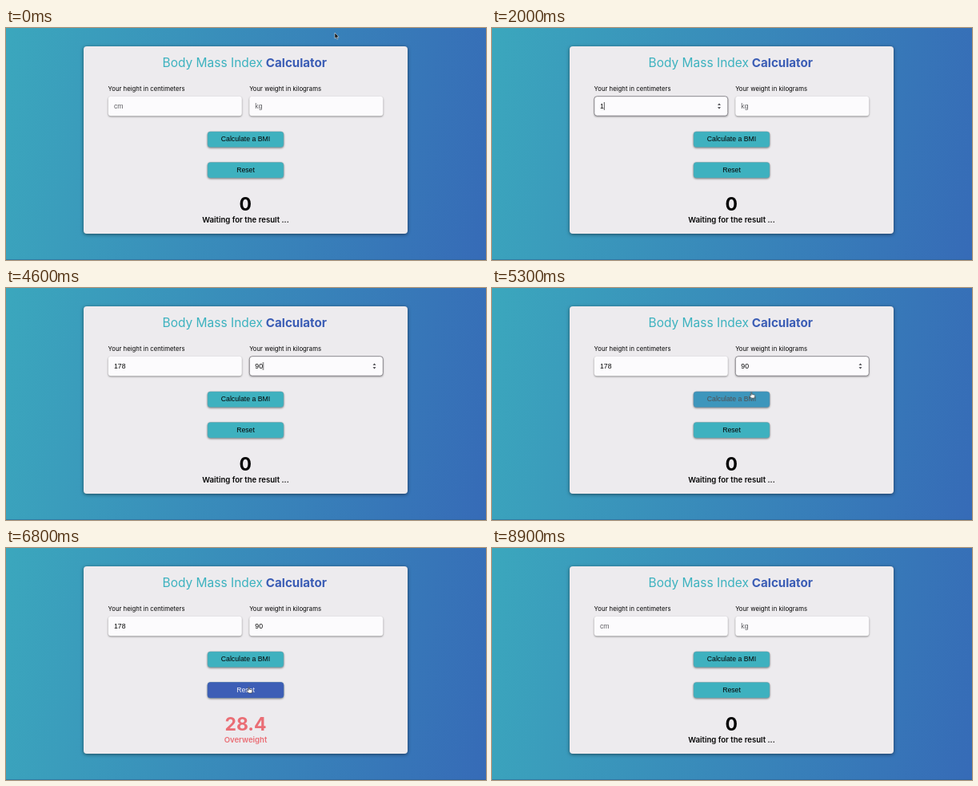
Animation, 600 px wide and 291 px high, one loop 9000 ms. Source, as an HTML page:

```html
<!DOCTYPE html>
<html lang="en">
<head>
<meta charset="utf-8">
<title>Body Mass Index Calculator</title>
<style>
html, body { margin: 0; width: 100%; height: 100%; overflow: hidden; }
body { background: linear-gradient(100deg, #3ba7bd, #366bb7); }
svg { display: block; width: 100vw; height: 100vh; }

text { font-family: Inter, "Open Sans", sans-serif; fill: #050505; }
.mid { text-anchor: middle; }
.title { font-size: 15.5px; fill: #3cb2bf; }
.strong { font-size: 15.15px; font-weight: 700; fill: #3b5db5; }
.label { font-size: 7.75px; }
.field, .btn text { font-family: "Liberation Sans", Arial, sans-serif; font-size: 8.7px; }
.hint { fill: #5c5c60; }
.score { font-size: 23px; font-weight: 700; }
.status { font-size: 9.6px; font-weight: 600; }
.over text { fill: #ea6e75; }

.card { fill: #edebee; filter: drop-shadow(0 1.5px 2px rgba(0, 0, 0, .5)); }
.box { fill: #fcfbfd; filter: drop-shadow(0 1.5px 1.2px rgba(0, 0, 0, .42)); }
.btn rect { fill: #3eb1bf; stroke: #6b9fa9; stroke-width: .5; }
.btn > rect { filter: drop-shadow(0 1.5px 1.2px rgba(0, 0, 0, .45)); }
.hover rect { fill: #3d5eb6; stroke: #4a64ae; }
.btn .hover text { fill: #f3f3f8; }
.ring { fill: none; stroke: #77747a; stroke-width: .8; }
.spin { fill: #3c3c40; }
.caret { fill: #111; }

/* Every timeline shares one 9 s loop; 1% is 90 ms */
.t { animation: 9s step-end infinite; }
.smooth { animation-timing-function: linear; }

.path { animation-name: path; }
.arrow { animation-name: arrow; }
.ibeam { animation-name: ibeam; }
.hand { animation-name: hand; }
.focus-h { animation-name: focus-h; }
.focus-w { animation-name: focus-w; }
.caret-h { animation-name: caret-h; }
.caret-w { animation-name: caret-w; }
.hint-h { animation-name: hint-h; }
.hint-w { animation-name: hint-w; }
.h1 { animation-name: h1; }
.h2 { animation-name: h2; }
.h3 { animation-name: h3; }
.w1 { animation-name: w1; }
.w2 { animation-name: w2; }
.idle { animation-name: idle; }
.over { animation-name: over; }
.hover-c { animation-name: hover-c; }
.hover-r { animation-name: hover-r; }

@keyframes path {
  0%, 1.1% { transform: translate(411px, 6px); }
  6.5%, 9% { transform: translate(380px, 50px); }
  16%, 31% { transform: translate(215px, 99px); }
  35.5% { transform: translate(296px, 110px); }
  39%, 53.3% { transform: translate(350px, 100px); }
  61%, 70% { transform: translate(316px, 147px); }
  74.5%, 85.5% { transform: translate(304.5px, 178px); }
  92%, 100% { transform: translate(300px, 302px); }
}
@keyframes arrow {
  0%, 55%, 70.4%, 86% { visibility: visible; }
  14.2%, 58.2%, 73%, 92% { visibility: hidden; }
}
@keyframes ibeam {
  0%, 21.5%, 45%, 55% { visibility: hidden; }
  14.2%, 31%, 53.3% { visibility: visible; }
}
@keyframes hand {
  0%, 70.4%, 86% { visibility: hidden; }
  58.2%, 73% { visibility: visible; }
}
@keyframes focus-h {
  0%, 39.5% { visibility: hidden; }
  17% { visibility: visible; }
}
@keyframes focus-w {
  0%, 62% { visibility: hidden; }
  39.5% { visibility: visible; }
}
@keyframes caret-h {
  0% { visibility: hidden; transform: none; }
  17% { visibility: visible; transform: none; }
  21.5% { visibility: visible; transform: translateX(4.8px); }
  25% { visibility: visible; transform: translateX(9.7px); }
  28% { visibility: visible; transform: translateX(14.5px); }
  33.5%, 100% { visibility: hidden; transform: translateX(14.5px); }
}
@keyframes caret-w {
  0% { visibility: hidden; transform: none; }
  39.5% { visibility: visible; transform: none; }
  45% { visibility: visible; transform: translateX(4.8px); }
  48.3% { visibility: visible; transform: translateX(9.7px); }
  53.9% { visibility: hidden; transform: translateX(9.7px); }
  59.4% { visibility: visible; transform: translateX(9.7px); }
  62%, 100% { visibility: hidden; transform: translateX(9.7px); }
}
@keyframes hint-h { 0%, 81% { visibility: visible; } 21.5% { visibility: hidden; } }
@keyframes hint-w { 0%, 81% { visibility: visible; } 45% { visibility: hidden; } }
@keyframes h1 { 0%, 81% { visibility: hidden; } 21.5% { visibility: visible; } }
@keyframes h2 { 0%, 81% { visibility: hidden; } 25% { visibility: visible; } }
@keyframes h3 { 0%, 81% { visibility: hidden; } 28% { visibility: visible; } }
@keyframes w1 { 0%, 81% { visibility: hidden; } 45% { visibility: visible; } }
@keyframes w2 { 0%, 81% { visibility: hidden; } 48.3% { visibility: visible; } }
@keyframes idle { 0%, 81% { visibility: visible; } 62.5% { visibility: hidden; } }
@keyframes over { 0%, 81% { visibility: hidden; } 62.5% { visibility: visible; } }
@keyframes hover-c { 0%, 58.2%, 72.6%, 100% { opacity: 0; } 60.4%, 70.4% { opacity: 1; } }
@keyframes hover-r { 0%, 73%, 88.2%, 100% { opacity: 0; } 75.2%, 86% { opacity: 1; } }
</style>
</head>
<body>
<svg viewBox="0 0 600 291" preserveAspectRatio="none">
  <defs>
    <rect id="box" width="167" height="24.5" rx="3.5"/>
    <rect id="btn" width="95" height="19.5" rx="3.5"/>
    <path id="spin" d="M-2 -1.2 0 -3.4 2 -1.2ZM-2 1.2 0 3.4 2 1.2Z"/>
  </defs>

  <rect y="290" width="600" height="1" fill="#2a5b8c" opacity=".5"/>
  <rect class="card" x="97" y="23" width="405" height="235" rx="4"/>

  <text class="title" x="195.5" y="49.3">Body Mass Index</text>
  <text class="strong" x="324.8" y="49.3">Calculator</text>

  <text class="label" x="127.6" y="79.2">Your height in centimeters</text>
  <text class="label" x="304.2" y="79.2">Your weight in kilograms</text>

  <use class="box" href="#box" x="127.8" y="85.7"/>
  <use class="box" href="#box" x="304.3" y="85.7"/>

  <g class="t focus-h">
    <use class="ring" href="#box" x="127.8" y="85.7"/>
    <use class="spin" href="#spin" x="284" y="98"/>
  </g>
  <g class="t focus-w">
    <use class="ring" href="#box" x="304.3" y="85.7"/>
    <use class="spin" href="#spin" x="460.5" y="98"/>
  </g>

  <text class="field hint t hint-h" x="135" y="100.8">cm</text>
  <text class="field hint t hint-w" x="311.3" y="100.8">kg</text>
  <text class="field" x="135" y="101"><tspan class="t h1">1</tspan><tspan class="t h2">7</tspan><tspan class="t h3">8</tspan></text>
  <text class="field" x="311.3" y="101"><tspan class="t w1">9</tspan><tspan class="t w2">0</tspan></text>
  <rect class="caret t caret-h" x="135.2" y="93" width=".7" height="10"/>
  <rect class="caret t caret-w" x="311.5" y="93" width=".7" height="10"/>

  <g class="btn" transform="translate(252 130)">
    <rect width="95" height="19.5" rx="3.5"/>
    <text class="mid" x="47.5" y="12.3">Calculate a BMI</text>
    <g class="hover t smooth hover-c">
      <rect width="95" height="19.5" rx="3.5"/>
      <text class="mid" x="47.5" y="12.3">Calculate a BMI</text>
    </g>
  </g>
  <g class="btn" transform="translate(252 168.5)">
    <rect width="95" height="19.5" rx="3.5"/>
    <text class="mid" x="47.5" y="12.3">Reset</text>
    <g class="hover t smooth hover-r">
      <rect width="95" height="19.5" rx="3.5"/>
      <text class="mid" x="47.5" y="12.3">Reset</text>
    </g>
  </g>

  <g class="t idle">
    <text class="score mid" x="299.3" y="229.3">0</text>
    <text class="status mid" x="299.5" y="243.7">Waiting for the result ...</text>
  </g>
  <g class="t over">
    <text class="score mid" x="299.5" y="229.3">28.4</text>
    <text class="status mid" x="299.5" y="243.7">Overweight</text>
  </g>

  <g class="t smooth path">
    <path class="t arrow" d="M0 0V7.2L1.6 5.8 2.7 8.2 3.9 7.7 2.8 5.3H5Z" fill="#111" stroke="#fff" stroke-width=".5"/>
    <path class="t ibeam" d="M-1.7-3.6Q0-3.6 0-2.6 0-3.6 1.7-3.6M0-2.6V2.6M-1.7 3.6Q0 3.6 0 2.6 0 3.6 1.7 3.6M-.9 1H.9" fill="none" stroke="#333" stroke-width=".8"/>
    <path class="t hand" d="M-1.6 .8V-3.2Q-1-4.2-.4-3.2V-.8L2.6-.2Q3.5 .1 3.4 1L2.8 4H-1.2L-3.3 1.2Q-3.2 .2-2.4 .4Z" fill="#fff" stroke="#222" stroke-width=".6"/>
  </g>
</svg>
</body>
</html>
```
